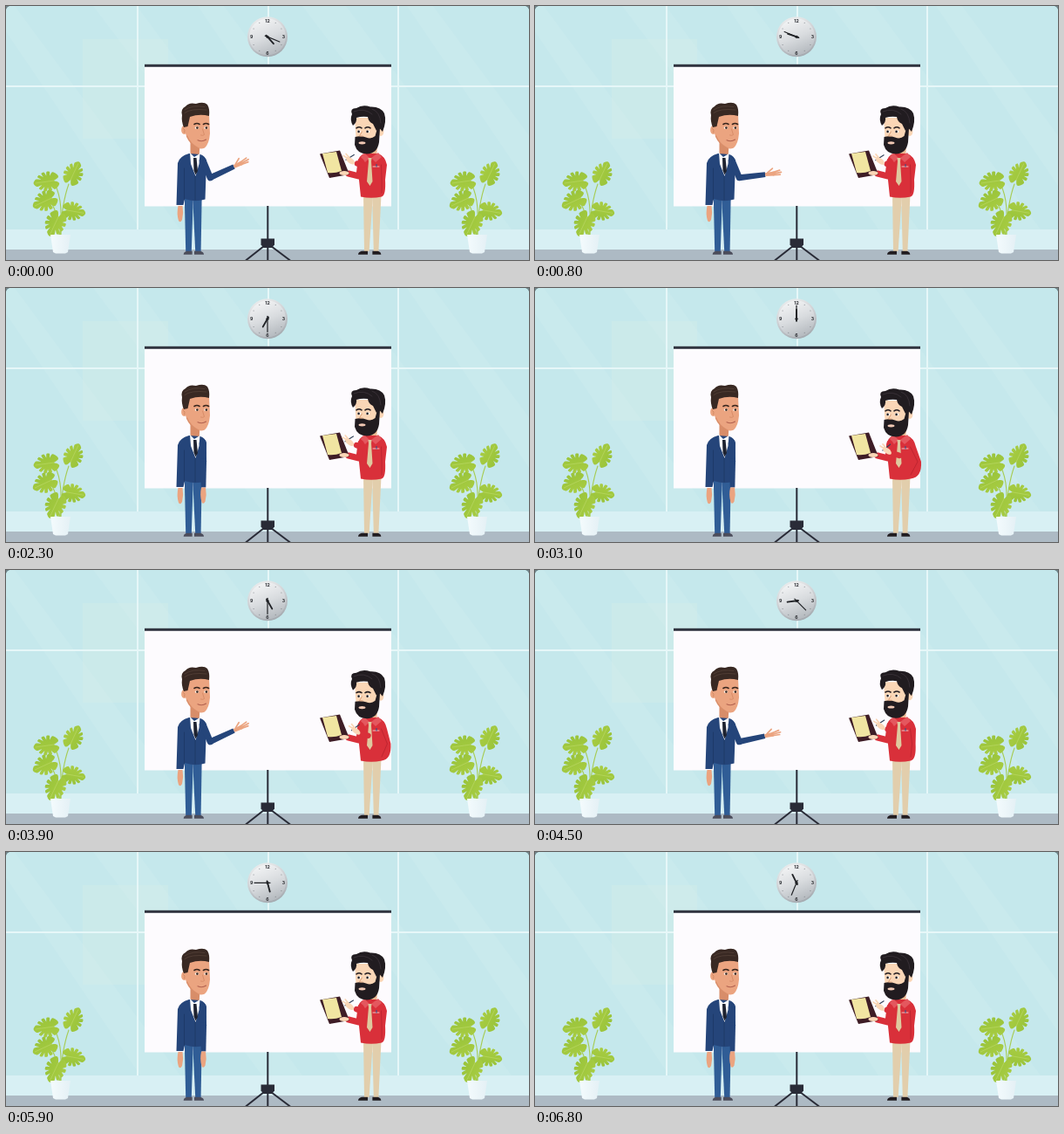
An HTML page with a canvas that plays this animation: 600 by 291 pixels, repeating every 6900 ms.

```html
<!DOCTYPE html>
<html lang="en">
<head>
<meta charset="utf-8">
<title>Meeting room</title>
<style>
html, body { margin: 0; width: 100%; height: 100%; overflow: hidden; background: #c5e8ec; }
canvas { display: block; width: 600px; height: 291px; }
</style>
</head>
<body>
<canvas id="stage" width="600" height="291"></canvas>
<script>
const c = document.getElementById('stage').getContext('2d');
const LOOP = 6900, STEP = 100, TAU = Math.PI * 2, RAD = Math.PI / 180;

const fill = (color, d) => { c.fillStyle = color; c.fill(new Path2D(d)); };
const rect = (color, x, y, w, h) => { c.fillStyle = color; c.fillRect(x, y, w, h); };
function line(color, width, d, cap = 'round') {
  c.strokeStyle = color;
  c.lineWidth = width;
  c.lineCap = cap;
  c.lineJoin = 'round';
  c.stroke(new Path2D(d));
}
function oval(color, x, y, rx, ry = rx) {
  c.fillStyle = color;
  c.beginPath();
  c.ellipse(x, y, rx, ry, 0, 0, TAU);
  c.fill();
}
function at(x, y, degrees, draw) {
  c.save();
  c.translate(x, y);
  c.rotate(degrees * RAD);
  draw();
  c.restore();
}
// vertical strip from centre x0 and width w0 to centre x1 and width w1
const taper = (color, x0, y0, w0, x1, y1, w1) =>
  fill(color, `M${x0 - w0 / 2} ${y0}h${w0}L${x1 + w1 / 2} ${y1}h${-w1}z`);
function gradient(x0, y0, x1, y1, ...colors) {
  const g = c.createLinearGradient(x0, y0, x1, y1);
  colors.forEach((color, i) => g.addColorStop(i / (colors.length - 1), color));
  return g;
}

// eased 0 to 1 while t goes from a to b
function ramp(t, a, b) {
  const k = Math.min(1, Math.max(0, (t - a) / (b - a)));
  return k * k * (3 - 2 * k);
}

function room() {
  rect('#c5e8ec', 0, 0, 600, 256);
  for (let i = 0; i < 5; i++)
    fill('rgba(255,255,255,.07)', `M${i * 120 - 20} 0h${30 + i % 2 * 20}l190 256h-46z`);
  rect('rgba(225,240,226,.2)', 88, 38, 98, 114);
  rect('#d8f0f4', 0, 256, 600, 23);
  line('#e6f7f8', 2, 'M0 92H600M151 0V256M450 0V256M301 0V70', 'butt');
  rect('#adbac4', 0, 279, 600, 12);
  fill('#6f8489', 'M0 0h4Q1 1 0 4zM600 0h-4q3 1 4 4z');
}

function screen() {
  const dark = '#292b37';
  rect('#fdfbfe', 159, 68, 283, 161.5);
  rect('#30343f', 159, 66.8, 283, 3);
  line(dark, 2, 'M300.3 229V291M296 275L275 291.5M304 275L326 291.5', 'butt');
  fill(dark, 'M292.5 266.500h15.5v7l-3 3.500h-9.500l-3-3.500z');
}

// the hour hand turns 6.25 hours a second, the long hand six times as fast
function clock(t) {
  const turn = 187.5 * (t - 3100) / 1000;
  at(300, 35.3, 0, () => {
    oval(gradient(-8, -22, 8, 22, '#e9ebec', '#c9ccd0', '#a3a8ae'), 0, 0, 23);
    oval(gradient(-8, -20, 8, 20, '#f2f3f4', '#d9dcdf', '#b4b9be'), 0, 0, 21);
    c.fillStyle = '#25272c';
    c.font = '700 5.2px Inter, Arial, sans-serif';
    c.textAlign = 'center';
    c.textBaseline = 'middle';
    for (let n = 1; n <= 12; n++) {
      const x = 18.4 * Math.sin(n * TAU / 12), y = -18.4 * Math.cos(n * TAU / 12);
      if (n % 3) oval('#70757b', x, y, .5);
      else c.fillStyle = '#25272c', c.fillText(n, x, y + .3);
    }
    at(0, 0, turn, () => line('#202226', 1.9, 'M0 2V-10.500'));
    at(0, 0, turn * 6, () => line('#202226', 1.2, 'M0 3V-15'));
    oval('#202226', 0, 0, 1.6);
  });
}

function leaf(x, y, degrees, size) {
  const bump = (v, mid, width) => Math.exp(-(((v - mid) / width) ** 2));
  at(x, y, degrees, () => {
    c.beginPath();
    for (let a = -Math.PI; a < Math.PI; a += .03) {
      const s = Math.abs(a);
      let r = 1 + .18 * bump(s, 0, .3) - .5 * bump(s, Math.PI, .22);
      for (let n = .5; n < 2.2; n += .48) r -= .42 * bump(s, n, .07);
      c.lineTo(size * r * Math.cos(a), size * r * .82 * Math.sin(a));
    }
    c.fillStyle = gradient(0, -size, 0, size, '#a9cd43', '#98c33a');
    c.fill();
    line('#bcd968', .6, `M${-size / 2} 0H${size}`);
  });
}

function plant(x) {
  at(x, 0, 0, () => {
    line('#a6cc55', 1.1, 'M62 264Q64 226 72 204M61 264Q67 226 56 204M60 264Q60 233 50 224M63 264Q63 244 70 237');
    leaf(77, 193, -65, 13.5);
    leaf(48, 201, 172, 14);
    leaf(46, 223, 155, 14);
    leaf(76, 235, 10, 13);
    leaf(57, 248, 115, 14.5);
    fill(gradient(51, 0, 74, 0, '#f4fbfd', '#e4f0f5'), 'M51 262H74L71 282L68 283.500H57L54 282z');
  });
}

function shoe(color, x, y, size, side) {
  at(x, y, 0, () => {
    c.scale(side, 1);
    fill(color, `M${-size * .4} 0V-4H${size * .3}Q${size * .7} -3 ${size * .7} 0z`);
  });
}

function eyes(x, y, gap, white, dark, look) {
  for (const side of [0, gap]) {
    line(dark, 1.6, `M${x + side - 3} ${y - 4}q3 -2 6 0`);
    oval(white, x + side, y, 2.3, 1.5);
    oval(dark, x + side + look, y + .1, 1.3, 1.4);
  }
}

const SKIN = '#eba480', SHADE = '#d88d69', NAVY = '#25457a', DEEP_NAVY = '#1b3560';

function openHand() {
  taper(SKIN, 0, 0, 4, 0, 10, 5);
  line(SKIN, 1.7, 'M2 3L6 9M1.500 9L3 17M0 9L.500 18.500M-1.500 9L-2 17');
}
function restHand() {
  fill(SKIN, 'M-2.500 0Q-4.500 9 -2 17Q0 20 2 16Q4 8 2.500 0z');
}

// the gesture repeats: palm shown and sinking, arm dropped, arm lifted again
function speaker(t) {
  const phase = t % 3900;
  const lift = 1 - ramp(phase, 1100, 1500) + ramp(phase, 3300, 3700);
  const upper = 2 + 22 * lift;
  const fore = lift * (104 + 11 * Math.cos(phase * TAU / 2200));

  taper('#305d96', 209.8, 218, 10, 209.5, 281, 6.6);
  taper('#305d96', 219.4, 218, 10.5, 220.4, 281, 6.4);
  shoe('#4c4d5b', 210, 284.8, 9, -1);
  shoe('#4c4d5b', 220, 284.8, 10, 1);
  at(200, 229, 0, restHand);

  taper(SHADE, 217, 156, 11, 216.500, 176, 10);
  fill(NAVY, 'M210 169Q199 172 197 180L195.500 228H203.500L205 221Q216 225 228.500 221.500L230 178Q229 172 223 170z');
  line(DEEP_NAVY, .7, 'M204.500 186V222M217 193V222');
  fill('#f9fafc', 'M211 168L216 173 222.500 169 221.500 181 217.500 195 212 181z');
  fill('#1d2230', 'M215 174h3.500l1.500 15-2.500 4.500-2-5z');
  speakerHead();

  at(225.8, 177.5, -upper, () => {
    oval(NAVY, 0, 0, 4);
    taper(NAVY, 0, 0, 8, 0, 21, 7);
    at(0, 21, upper - fore, () => {
      oval(NAVY, 0, 0, 3.6);
      taper(NAVY, 0, 0, 7, 0, 30, 5.6);
      at(0, 30, 0, fore > 35 ? openHand : restHand);
    });
  });
}

function speakerHead() {
  oval(SKIN, 204.5, 142, 3.4, 5);
  line('#c98058', .7, 'M203.500 140Q206 142 204.800 145');
  fill(SKIN, 'M206 124H233L234 146Q233 158 228 162.500Q222 165.500 215.500 160Q208 155 206 146z');
  line(SHADE, 1.3, 'M207.500 149Q212 159 221 163');
  fill('#392923', 'M204 139Q201 132 202 125Q200 118 206 115Q210 110 218 112Q227 109 231 113Q234 118 233 126Q222 123 211 127L208.500 138z');
  line('#5a463c', .7, 'M205 119Q214 113 228 115.500M205 122.500Q212 117 230 119');
  eyes(219, 139.500, 10.500, '#fff0e5', '#38251d', .4);
  line(SHADE, 1, 'M225.500 141L227.500 147.500Q226 149 223.500 148');
  line('#b0604f', 1.1, 'M220 153.700Q225 156 229.500 153');
}

const RED = '#d9303a', DEEP_RED = '#b8222e', PALE = '#fad6b6', BLACK = '#211c20';

// scribbles all the time, and once per loop draws back to rest the elbow wide
function writer(t) {
  const rest = ramp(t, 2300, 3100) - ramp(t, 3500, 4900);
  const wiggle = Math.sin(t * TAU / 600);
  const x = 393 + 8 * rest + wiggle, y = 175.5 + 9 * rest + wiggle / 2;
  const elbow = 435 + 8 * rest;

  taper('#e2ceac', 415.500, 215, 11, 413.800, 281, 5.600);
  taper('#e2ceac', 425.300, 215, 10.500, 424.600, 281, 5.600);
  shoe(BLACK, 411, 284.800, 10, -1);
  shoe(BLACK, 424, 284.800, 9, 1);

  taper('#eab791', 419, 160, 14, 418, 176, 14);
  fill(RED, `M411 169Q405 171 403 180L407 218.500Q419 221 431 218.500Q${elbow + 1} 217 ${elbow} 199L437 182Q435 172 427 169z`);
  line(DEEP_RED, .8, `M430.500 182L${elbow - 4} 199 431 214`);
  fill('#e4575e', 'M411 168L417 174 412 179 407 173zM427 168L419 174 424 179 431 173z');
  fill('#dfc99f', 'M415.500 174h4l-.500 4 1.500 23-3 5-3.500-5 2-23z');
  line('#f2d4d0', .9, 'M421 184H428');
  line('#36528a', 1.1, 'M425 181.500V184');
  at(0, rest, 0, writerHead);

  line(RED, 7, 'M407 178L405 195 393 192');
  fill('#3e1d26', 'M360 169.500L383 165.500 394 193 371 197z');
  fill('#f1e5a2', 'M363 169L379 167 385 189Q377 192 369 191z');
  oval(PALE, 388, 191.500, 5.500, 2.600);

  line(RED, 6.500, `M${x + 16} ${y + 7}L${x + 10} ${y + 5}`);
  at(x, y, -32 - 6 * rest, () => line('#34445c', 1.2, 'M-3 -1H8'));
  at(x, y, 38, () => {
    oval(PALE, 2.500, 0, 6, 3);
    line(PALE, 1.7, 'M-2 0L-7 .500M-1 -2L-6 -3');
  });
}

function writerHead() {
  oval(PALE, 430, 144, 3.4, 5);
  fill(PALE, 'M400 128H427L428 155Q414 164 402 158z');
  fill(BLACK, 'M400.500 150L400 159Q403 169.500 414 169.500Q426 169 428 156L429 140H426L423.500 149Q419 153 413 150.500Q407 148.500 400.500 150z');
  fill(BLACK, 'M398 137Q394 130 397 124Q394 117 402 117Q409 112.500 418 115.500Q430 115 434 123Q437 132 432 144L428.500 140 425 143 421 135Q416 133 415 127Q408 126 402 128Q403 133 398 137z');
  line('#413840', .7, 'M399 121Q411 116 420 124M420 118Q429 121 430 134');
  eyes(405, 143.800, 10, '#fff', BLACK, -.4);
  line('#dba27d', 1, 'M408.500 144L405.500 149H409');
  oval('#f0c8b4', 408.500, 156.800, 4, 1.600);
}

function draw() {
  const t = Math.floor((performance.now() - start) % LOOP / STEP) * STEP;
  room();
  clock(t);
  screen();
  plant(0);
  plant(478);
  speaker(t);
  writer(t);
  requestAnimationFrame(draw);
}
const start = performance.now();
draw();
</script>
</body>
</html>
```
